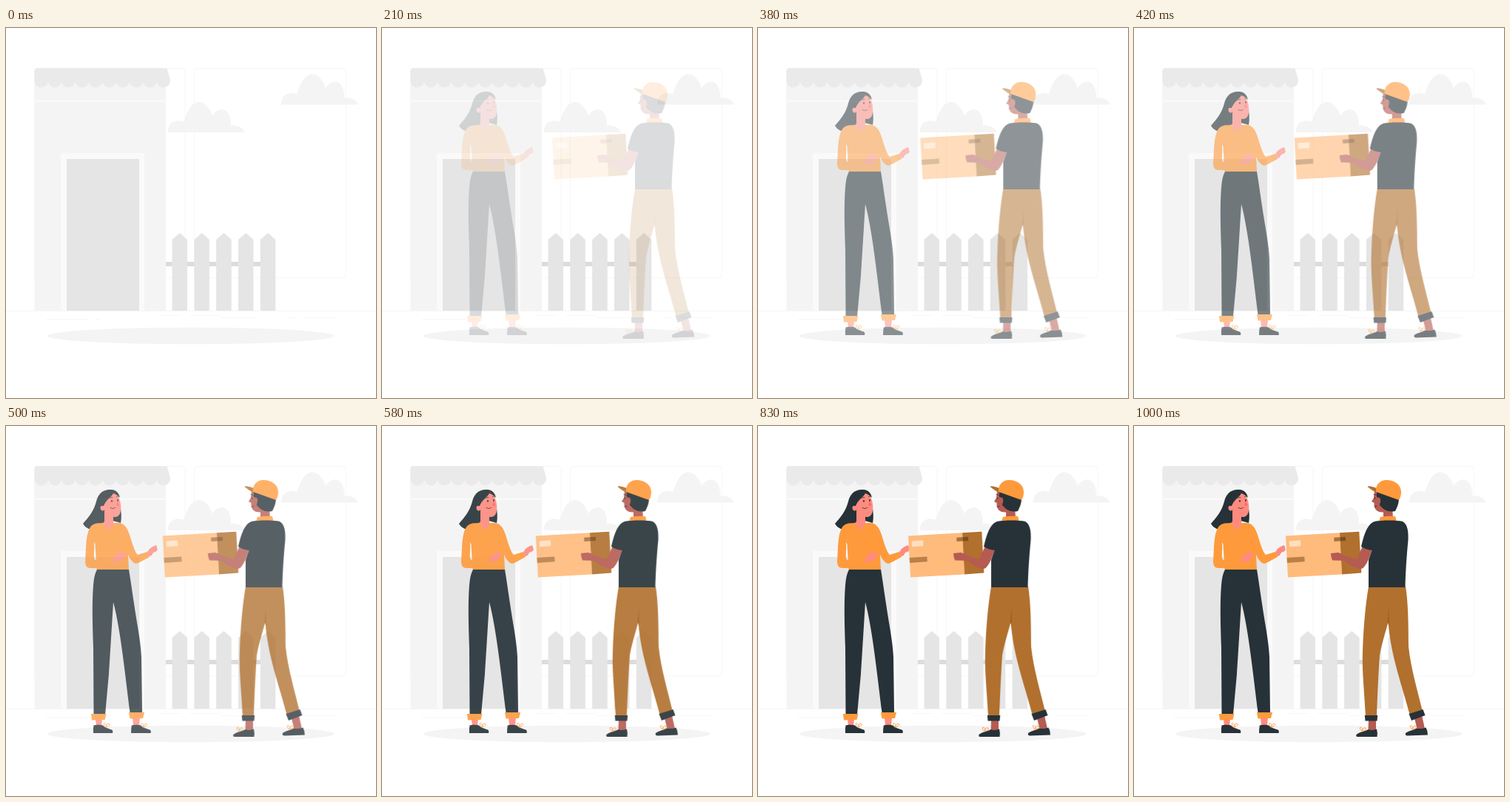
An HTML page without scripts for the animation above (1040 ms loop, 500x500 px).

```html
<!DOCTYPE html>
<html lang="en">
<head>
<meta charset="utf-8">
<title>Parcel delivery</title>
<style>
html, body { margin: 0; width: 100%; height: 100%; overflow: hidden; background: #fff; }
svg { display: block; width: 100vw; height: 100vh; }
.ink { fill: #263238; }
.orange { fill: #ff9a3c; }
.rose { fill: #ff8b7f; }
.tan { fill: #b55b52; }
.brown { fill: #b1702e; }
.pale { fill: #f4f4f4; }
.grey { fill: #e5e5e5; }
.line { fill: none; stroke-linecap: round; stroke-linejoin: round; }
.lace { stroke: #ff9a3c; stroke-width: 1; }
.feature { stroke: #263238; stroke-width: .8; }
.woman, .man { animation: 1.04s infinite; }
.woman { animation-name: fade; }
.man { animation-name: fade, slide; }
@keyframes fade {
  0% { opacity: 0; animation-timing-function: cubic-bezier(.36, -.01, .5, 1.38); }
  93.3%, 100% { opacity: 1; }
}
@keyframes slide {
  0% { transform: translateX(30px); animation-timing-function: cubic-bezier(.36, -.01, .5, 1.38); }
  93.3%, 100% { transform: none; }
}
</style>
</head>
<body>
<svg viewBox="0 0 500 500">
  <defs>
    <path id="cloud" d="M219 141C218 130 227 122 240 127C244 115 250 100 261 100C270 100 276 110 279 119C283 112 287 110 293 110C301 112 304 120 304 132C312 131 320 134 323 141Z"/>
    <path id="picket" d="M224.5 382V286L234.8 277L245 286V382Z"/>
    <path id="lace" d="M0 4C-3 1-2-1 0 0S3 3 1 5M1 4C2 1 5-1 6 1S4 4 2 5"/>
  </defs>

  <g class="line" stroke="#f7f7f7">
    <rect x="38.5" y="54.5" width="203.5" height="283" rx="4"/>
    <rect x="254.5" y="54.5" width="204.5" height="283" rx="4"/>
  </g>
  <path class="line" stroke="#ebebeb" stroke-width=".6" d="M0 382.3H500"/>
  <path class="line" stroke="#efefef" stroke-width=".5" d="M54 394H112M121 394H128M208 388.5H236M248 388.5H290M290 391.3H338M383 391.3H392M402 391.3H447"/>

  <!-- house -->
  <path class="pale" d="M38.5 58H216V382H38.5Z"/>
  <path fill="#fafafa" d="M38.5 97.5H216V100H38.5ZM74 169H187V382H74Z"/>
  <path class="grey" d="M82 177H180V382H82Z"/>
  <path fill="#eaeaea" d="M38.5 72V58Q38.5 54.300 42.500 54.300H217.500L222 70V72a9.200 9.200 0 0 1-18.350 0a9.200 9.200 0 0 1-18.350 0a9.200 9.200 0 0 1-18.350 0a9.200 9.200 0 0 1-18.350 0a9.200 9.200 0 0 1-18.350 0a9.200 9.200 0 0 1-18.350 0a9.200 9.200 0 0 1-18.350 0a9.200 9.200 0 0 1-18.350 0a9.200 9.200 0 0 1-18.350 0a9.200 9.200 0 0 1-18.350 0Z"/>

  <use href="#cloud" class="pale"/>
  <use href="#cloud" class="pale" x="153" y="-37.500"/>

  <!-- fence -->
  <path fill="#dcdcdc" d="M216 316H346V322H216Z"/>
  <g class="grey">
    <use href="#picket"/>
    <use href="#picket" x="29.800"/>
    <use href="#picket" x="59.600"/>
    <use href="#picket" x="89.400"/>
    <use href="#picket" x="119.200"/>
  </g>
  <ellipse class="pale" cx="249.500" cy="416" rx="194" ry="11.300"/>

  <g class="woman">
    <path class="ink" d="M143 86C131 85 124 92 122 102C119 114 112 123 104 132C108 139 115 141 122 139L134 132L144 128L155 131C157 122 155 112 154 104L150 90Z"/>
    <path class="rose" d="M121 396H130L129 406H122ZM171 394H181L180 405H172Z"/>
    <path class="ink" d="M118.500 404.500Q124 403 131 404.500C134 408 139 409 143 410.500Q145 412 144 415H118Q117.500 409 118.500 404.500ZM169.800 404.500Q176 403 182 404.500C185 408 190 409 194.500 410.500Q196.500 412 195.500 415H169Q169 409 169.800 404.500Z"/>
    <use href="#lace" class="line lace" x="134" y="402"/>
    <use href="#lace" class="line lace" x="184.500" y="402"/>
    <path class="ink" d="M123 194H166C169 212 171 227 173 240C177 268 182 290 183 312L184 387H167.500C162 345 155 275 145 238C143 270 140 320 139 335L134 390H118.500L118 300C117 270 116 240 118 215Q119 201 123 194Z"/>
    <path class="orange" d="M115 389H135.500L133.500 397L116 397.500ZM166 387H187L185 395L167.500 395.500Z"/>

    <path class="rose" d="M133 108L145 120V131L148 133L139 145L128 134L133 129Z"/>
    <path class="rose" d="M142 91C150 90 154 97 155 106C156 116 154 123 147 123C140 123 135 118 133 113A3 4 0 1 1 132 107Z"/>
    <path class="ink" d="M140 86.300C147 85 153 90 154 97C150 92 148 91 145 91C141 98 134 100 132 108L128 108C124 97 129 87 140 86.300Z"/>
    <path fill="#ff5f5a" d="M150.500 102L153 107L149.500 108Z"/>
    <path class="line feature" d="M140.500 97.500Q142 95.500 144 96.500M149.500 95.500Q151 94 152.500 95.500M141 110.500Q144 113 147.500 110.500"/>
    <ellipse class="ink" cx="143" cy="101.500" rx=".9" ry="1.400"/>
    <ellipse class="ink" cx="151" cy="100.500" rx=".9" ry="1.400"/>

    <path class="orange" d="M131 131L139 141L146 131H152C160 131 164 138 167 147C171 160 174 170 178 174L191 170L194 177C186 181 180 185 176 186C171 185 167 179 165 174L166 194H122.500L120.500 160L113 145Q116 133 122 131.500Z"/>
    <path class="orange" d="M121 132C111 134 109 148 108 165L107 183Q107 192 114 192H126L150 184L148 179L121 181C117 180 120 170 119 158Z"/>
    <path class="rose" d="M144 183C146 175 150 172 157 170Q161 170 161 174C160 180 154 183 147 184ZM191 171C193 165 198 163 203 161Q204 163 204.500 166Q206 169 199 171C198 174 196 176 193.500 176Z"/>
  </g>

  <g class="man">
    <path fill="#ffbb7c" d="M205 148.500L278 144.300L281 200.500L208 204.500Z"/>
    <path class="brown" d="M278 144.300L304.300 142.800L307.300 198.500L281 200.500Z"/>
    <path fill="#ffdfc0" d="M209.500 155.500L225 154.600L225.400 162.300L210 163.300Z"/>
    <path fill="#b98048" d="M206.600 178L230.300 176.600L230.700 183.200L207 184.900Z"/>
    <path fill="#aa703c" d="M270.200 150.800L278.300 150.300L278.600 155.500L270.500 156Z"/>
    <path fill="#7c4e20" d="M278.300 150.300L285.800 149.800L286.100 155L278.600 155.500Z"/>

    <path class="tan" d="M317 397H327V412H316.500ZM379 395L389 391L393 409L383 411Z"/>
    <path class="ink" d="M300.500 417C305 413 312 413 316.500 410Q322 412 328 409.500Q329.500 415 328.500 420H302Q299.500 420 300.500 417ZM367 415C371 412 378 411 382 408.500Q388 410 394.500 407.500Q397 412 397 417.500L369 418.500Q366 418 367 415Z"/>
    <use href="#lace" class="line lace" x="307" y="407.500"/>
    <use href="#lace" class="line lace" x="375" y="405"/>
    <path class="brown" d="M317 217H367C370 235 371 260 371 298C374 328 384 360 389.500 384L372.500 390C363 352 347 312 343.500 265C338 285 334 298 332 310C330 340 329 365 328 392H313C311 355 308 330 309 305C310 272 313 240 317 217Z"/>
    <path fill="#8d5822" d="M344.300 246L344.500 270L343 265Z"/>
    <path class="ink" d="M311.800 391H329.200L328.500 398.500H312.500ZM371.500 389L390.500 383L393.500 391L375 398Z"/>

    <path class="tan" d="M325 88L324 97L321 102L324.500 104C324 112 328 117 337 116.500V125H350L349 108L335 89Z"/>
    <path class="ink" d="M328 89L358 98C358 105 355 111 353 115Q344 117 337 112L332 107L333 98L328 96Z"/>
    <ellipse class="tan" cx="330" cy="101" rx="3.200" ry="4.500"/>
    <path class="line feature" d="M324 92.500L327.500 93.500M325.500 96.500V98.500M325 109L328 108.500"/>
    <path fill="#b1702e" d="M315.500 82Q317 80 328 84L327 90Q320 86 315.500 82Z"/>
    <path class="orange" d="M327 89C326 79 333 73 341 73C353 73 361 80 361 89Q361 96 358 100C347 96 338 93 327 89Z"/>
    <path class="orange" d="M333 123Q343 121 353 122L355 129H331Z"/>

    <path class="tan" d="M309 162L322 166C318 179 314 188 309.500 192C305 195 300 191 294 189L284 182L268 181.500Q266 177 266 172L276 171Q281 172 286 176L301 180Z"/>
    <path class="ink" d="M325 129C336 127 354 127 363 129C370 133 371 143 370.500 154C368 180 367 200 366.500 218H317V181L321.500 168Q313 167 307 163C310 151 314 133 325 129Z"/>
  </g>
</svg>
</body>
</html>
```
